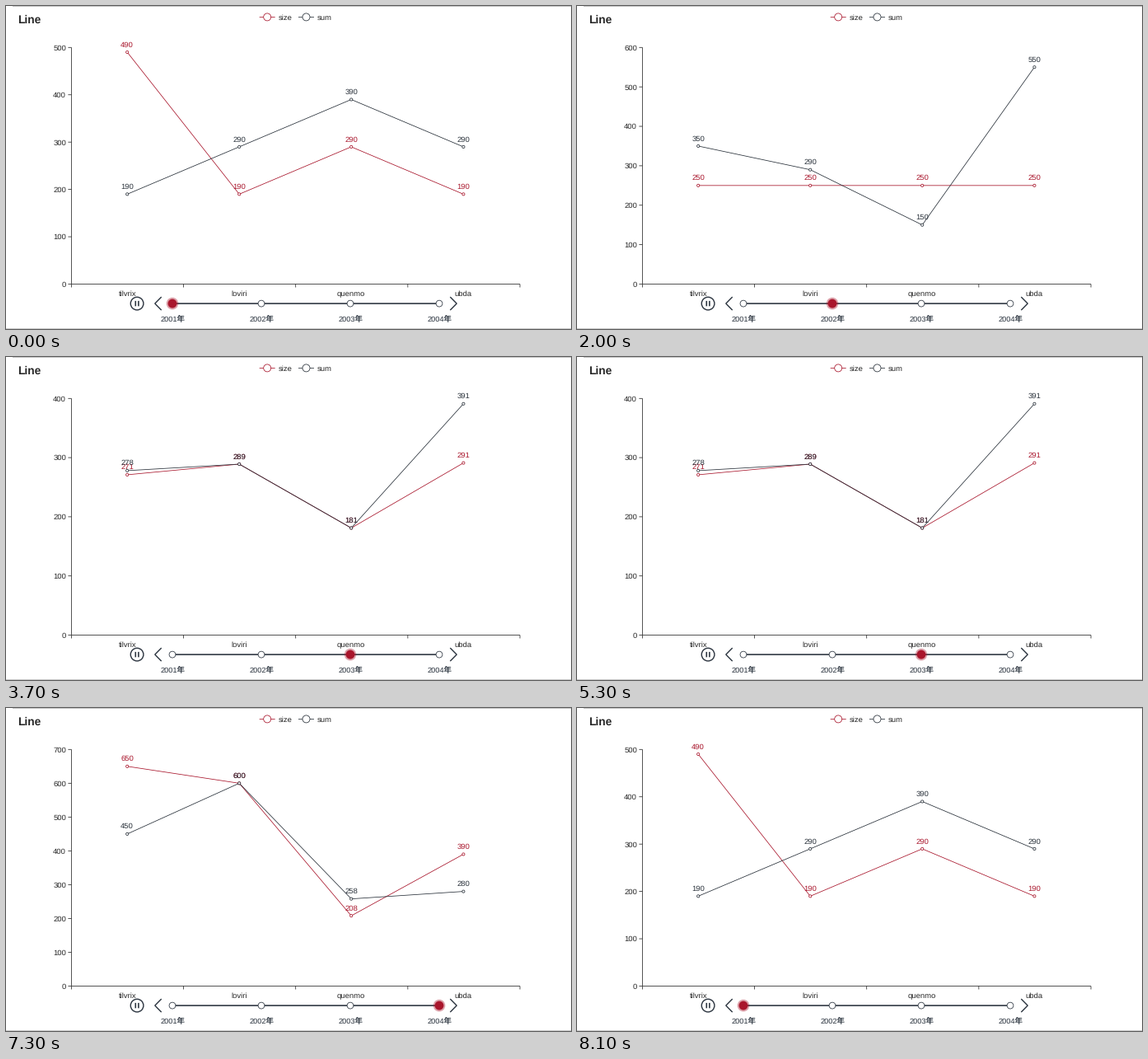
Write a matplotlib script that moves like this. It is 686 px wide and 392 px high and loops after 8.2 s.

```python
import matplotlib.pyplot as plt
from matplotlib.animation import FuncAnimation
from matplotlib.patches import Circle

W, H, DPI = 686, 392, 100
PX = 72 / DPI
STEP, FRAMES = 100, 82
FIRST_SWITCH, HOLD, MORPH = 1351, 2000, 300

RED, SLATE, INK, NAVY = "#a9162c", "#29313a", "#262626", "#2b343f"
HAIR = 0.78
LEFT, RIGHT, TOP, BASE = 79.4, 624, 50.3, 337.5
RAIL = 361.1
FONTS = ["Liberation Sans", "Noto Sans CJK JP"]

POINTS_X = [147.2, 283.2, 419.2, 555.4]
STOPS_X = [202, 310, 418, 526]
NAMES = ["tilvrix", "loviri", "quenmo", "ubda"]

# axis maximum, size values, sum values
YEARS = [
    (500, [490, 190, 290, 190], [190, 290, 390, 290]),
    (600, [250, 250, 250, 250], [350, 290, 150, 550]),
    (400, [271, 289, 181, 291], [278, 289, 181, 391]),
    (700, [650, 600, 208, 390], [450, 600, 258, 280]),
]

plt.rcParams["text.hinting"] = "no_hinting"

fig = plt.figure(figsize=(W / DPI, H / DPI), dpi=DPI, facecolor="white")
ax = fig.add_axes([0, 0, 1, 1])
ax.set_xlim(0, W)
ax.set_ylim(H, 0)
ax.axis("off")


def stroke(xs, ys, color, width=HAIR, z=1):
    line, = ax.plot(xs, ys, color=color, lw=width * PX, zorder=z, snap=False,
                    solid_capstyle="butt", solid_joinstyle="miter")
    return line


def ring(x, y, r, color, width=HAIR, face="white", z=3):
    return ax.add_patch(Circle((x, y), r, fc=face, ec=color,
                               lw=width * PX, zorder=z))


def write(x, y, text, color=INK, size=9.5, ha="center", z=4, **kw):
    """Place text so that its capitals are centred on y."""
    return ax.text(x, y + size * 0.36, text, color=color, fontsize=size * PX,
                   fontfamily=FONTS, ha=ha, va="baseline", zorder=z, **kw)


def cubic_out(u):
    return 1 - (1 - u) ** 3


def quintic_in_out(u):
    return 16 * u ** 5 if u < 0.5 else 1 - 16 * (1 - u) ** 5


def mix(a, b, p):
    return a + (b - a) * p


def to_y(value, top):
    return BASE - (BASE - TOP) * value / top


# page edges and title
stroke([8, W], [0.5, 0.5], "#c6c6c6", 1)
stroke([0, W], [391.5, 391.5], "#cccccc", 1)
write(14.3, 16, "Line", size=13.8, ha="left", weight="bold")

# legend
for x, name, color in [(317.2, "size", RED), (364.5, "sum", SLATE)]:
    stroke([x - 9.5, x + 9.5], [13.4, 13.4], color)
    ring(x, 13.4, 4.5, color)
    write(x + 13.2, 13.7, name, ha="left")

# axes
stroke([LEFT, LEFT], [TOP, BASE], INK)
stroke([LEFT, RIGHT], [BASE, BASE], INK)
for i in range(5):
    x = LEFT + (RIGHT - LEFT) * i / 4
    stroke([x, x], [BASE, BASE + 4], INK)
for x, name in zip(POINTS_X, NAMES):
    write(x, 348.7, name)

ticks = [(v, stroke([LEFT - 4, LEFT], [BASE, BASE], INK),
          write(73, BASE, str(v), ha="right")) for v in range(0, 701, 100)]

# timeline
stroke([STOPS_X[0], STOPS_X[-1]], [RAIL, RAIL], NAVY, 1.6)
for x, year in zip(STOPS_X, range(2001, 2005)):
    ring(x, RAIL, 3.9, NAVY)
    write(x + 0.4, 378.5, f"{year}年", NAVY, size=9.3)
ring(159.1, RAIL, 7.8, NAVY, 1.4)
for x in (157.3, 160.9):
    stroke([x, x], [RAIL - 3.2, RAIL + 3.2], NAVY, 1.6, z=4)
for tip, back in [(180.8, 188.7), (547.2, 539.3)]:
    stroke([back, tip, back], [RAIL - 8, RAIL, RAIL + 8], NAVY, 1.4)

halo = Circle((0, RAIL), 7.3, fc=RED, alpha=0.4, lw=0, zorder=5)
core = Circle((0, RAIL), 5.4, fc=RED, lw=0, zorder=6)
ax.add_patch(halo)
ax.add_patch(core)


class Series:
    def __init__(self, slot, color, z):
        self.slot = slot
        self.line = stroke(POINTS_X, [BASE] * 4, color, z=z)
        self.dots = [ring(x, BASE, 1.6, color, z=z + 0.1) for x in POINTS_X]
        self.labels = [write(x, BASE, "", color, z=z + 0.2) for x in POINTS_X]

    def update(self, old, new, p):
        ys = [mix(to_y(a, old[0]), to_y(b, new[0]), p)
              for a, b in zip(old[self.slot], new[self.slot])]
        self.line.set_ydata(ys)
        for x, y, value, dot, label in zip(POINTS_X, ys, new[self.slot],
                                           self.dots, self.labels):
            dot.center = (x, y)
            label.set_text(str(value))
            label.set_y(y - 6.5)


series = [Series(1, RED, 7), Series(2, SLATE, 8)]


def draw(frame):
    turn, since = divmod(frame * STEP - FIRST_SWITCH, HOLD)
    now, before = (turn + 1) % 4, turn % 4
    u = min(1, since / MORPH)
    p = cubic_out(u)
    old, new = YEARS[before], YEARS[now]

    for value, mark, label in ticks:
        shown = value <= new[0]
        y = to_y(value, new[0])
        if value <= old[0]:
            y = mix(to_y(value, old[0]), y, p)
        mark.set_ydata([y, y])
        label.set_y(y + 3.3)
        mark.set_visible(shown)
        label.set_visible(shown)

    for s in series:
        s.update(old, new, p)

    x = mix(STOPS_X[before], STOPS_X[now], quintic_in_out(u))
    halo.center = core.center = (x, RAIL)
    return []


anim = FuncAnimation(fig, draw, frames=FRAMES, interval=STEP,
                     init_func=lambda: draw(0), repeat=True, repeat_delay=0)
plt.show()
```
